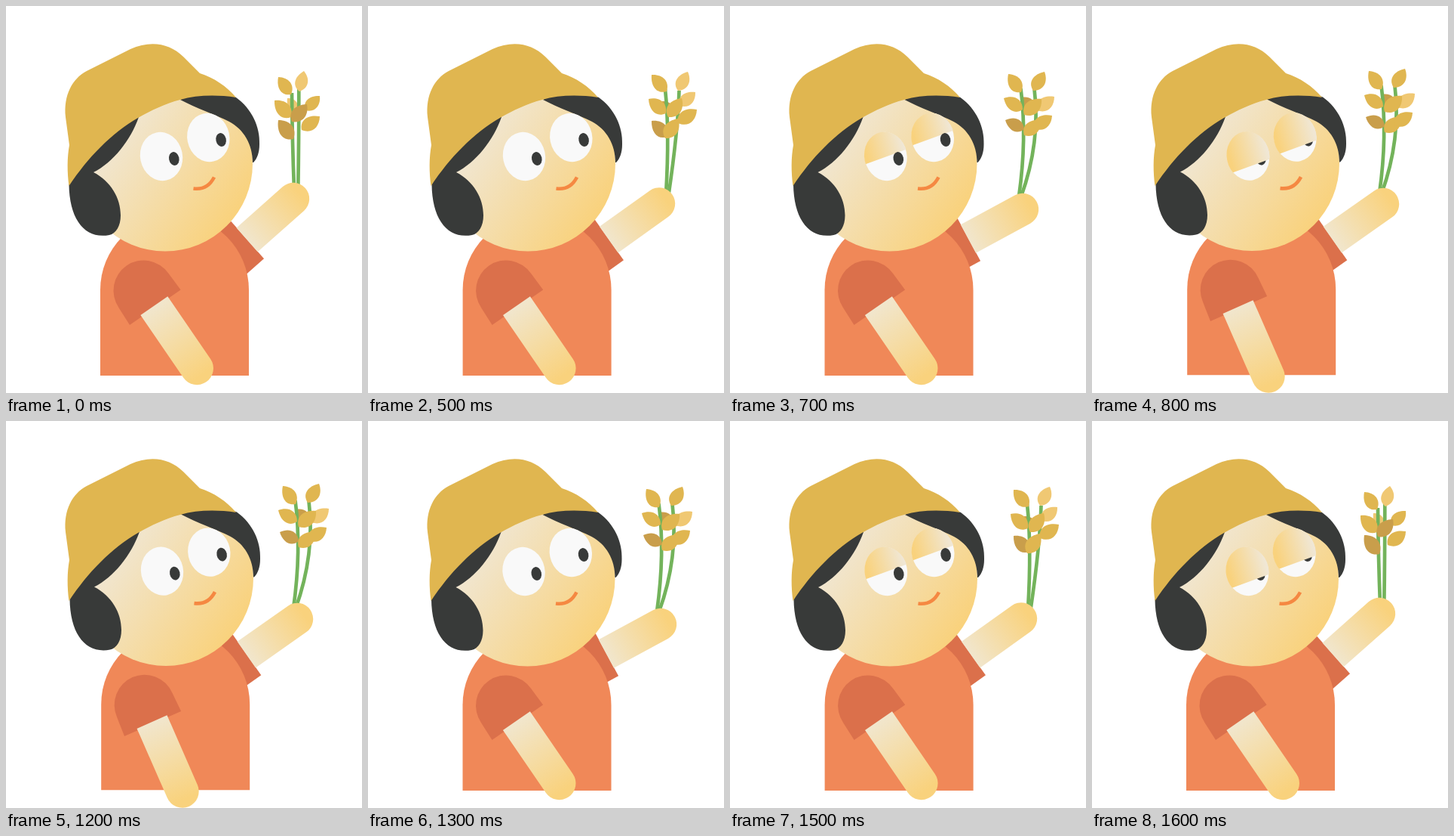
Animation of 472 by 512 pixels, one loop 1800 ms. Source, as an HTML page with a canvas:

```html
<!DOCTYPE html>
<html lang="en">
<head>
<meta charset="utf-8">
<title>Girl with wheat</title>
<style>
html, body { margin: 0; width: 100%; height: 100%; overflow: hidden; background: #fff; }
canvas { display: block; }
</style>
</head>
<body>
<canvas id="stage" width="472" height="512"></canvas>
<script>
const ctx = document.getElementById('stage').getContext('2d');
const RAD = Math.PI / 180, LOOP = 1800;
const SKIN = '#f9d27d', PALE = '#f0e7d5', HAIR = '#383a39', HAT = '#e0b650';
const SHIRT = '#f08858', SLEEVE = '#db704b', STEM = '#73b35b';
const GRAIN = { l: '#f0c873', m: '#e0b650', d: '#c99e4b' };

// Each leaf: colour, base x, base y, tip x, tip y. The first one lies behind the stems.
const straight = {
  stems: [[379, 115, 379.5, 180, 382, 242], [388.3, 109, 388.3, 180, 387.3, 242]],
  leaves: [
    ['l', 386, 138, 373, 122], ['m', 378, 117, 361, 94], ['l', 389, 113, 395, 86],
    ['m', 378, 147, 356, 125], ['m', 397, 138, 416, 119],
    ['d', 379, 153, 399, 130], ['d', 381, 176, 361, 151], ['m', 392, 164, 416, 146]]
};
const leanRight = {
  stems: [[394, 110, 400, 165, 395, 250], [412.5, 112, 411, 165, 398.5, 250]],
  leaves: [
    ['d', 403, 139, 390, 126], ['m', 396, 113, 376, 91], ['l', 411, 112, 424, 87],
    ['m', 395, 142, 372, 123], ['l', 413, 132, 434, 114], ['m', 398, 147, 416, 122],
    ['d', 397, 173, 376, 152], ['m', 394, 175, 411, 149], ['m', 411, 155, 436, 137]]
};
const leanLeft = {
  stems: [[385.5, 109, 394, 175, 383, 252], [403.5, 110, 412, 180, 386, 252]],
  leaves: [
    ['d', 404, 136, 386, 121], ['m', 386, 114, 369, 90], ['m', 402, 112, 417, 87],
    ['m', 388, 137, 363, 122], ['l', 407, 138, 430, 120], ['m', 390, 144, 413, 123],
    ['d', 390, 163, 365, 151], ['m', 390, 171, 412, 151], ['m', 403, 162, 427, 145]]
};

const up = { hand: [381, 255], tilt: -41.5, wheat: straight, sway: [0, 0],
             head: [0, 0], body: [0, 0], swing: 55.5 };
const mid = { ...up, hand: [386, 261.5], tilt: -35.5, wheat: leanRight, head: [1, 0], body: [0.6, 0] };
const low = { ...up, hand: [388, 269], tilt: -28.4, wheat: leanLeft, head: [0.5, 0], body: [0.5, 0] };
const far = { ...up, hand: [382.5, 255], wheat: straight, sway: [12, 0.5],
              head: [1.2, -0.7], body: [1.2, -0.8], swing: 66.3 };
const turn = { ...far, hand: [386, 262], tilt: -35, wheat: leanLeft, sway: [-2, -4], head: [1, -0.4] };

// Start time, pose, lid (0 open, 1 half, 2 nearly shut)
const steps = [
  [0, up, 0], [500, mid, 0], [700, low, 1], [800, turn, 2], [1000, far, 1],
  [1200, turn, 0], [1300, low, 0], [1500, mid, 1], [1600, up, 2]
];

function at([x, y], deg, draw) {
  ctx.save();
  ctx.translate(x, y);
  ctx.rotate(deg * RAD);
  draw();
  ctx.restore();
}

function shape(d, color) {
  ctx.fillStyle = color;
  ctx.fill(new Path2D(d));
}

function oval(x, y, rx, ry, deg, color) {
  ctx.beginPath();
  ctx.ellipse(x, y, rx, ry, deg * RAD, 0, 2 * Math.PI);
  ctx.fillStyle = color;
  ctx.fill();
}

function blend(x0, y0, x1, y1, from, to) {
  const g = ctx.createLinearGradient(x0, y0, x1, y1);
  g.addColorStop(0, from);
  g.addColorStop(1, to);
  return g;
}

function forearm(start, end, r) {
  ctx.beginPath();
  ctx.moveTo(start, -r);
  ctx.lineTo(end, -r);
  ctx.arc(end, 0, r, -Math.PI / 2, Math.PI / 2);
  ctx.lineTo(start, r);
  ctx.fillStyle = blend(start, 0, end + r / 2, 0, '#f1e6cd', SKIN);
  ctx.fill();
}

function leaf([tone, x0, y0, x1, y1]) {
  const len = Math.hypot(x1 - x0, y1 - y0), w = len * 0.42;
  at([x0, y0], Math.atan2(y1 - y0, x1 - x0) / RAD, () => {
    ctx.beginPath();
    ctx.moveTo(0, 0);
    ctx.bezierCurveTo(len * 0.2, -w, len * 0.65, -w * 0.9, len, 0);
    ctx.bezierCurveTo(len * 0.7, w * 0.9, len * 0.25, w, 0, 0);
    ctx.fillStyle = GRAIN[tone];
    ctx.fill();
  });
}

function wheat({ stems, leaves }) {
  leaf(leaves[0]);
  ctx.strokeStyle = STEM;
  ctx.lineWidth = 4.7;
  for (const [x0, y0, cx, cy, x1, y1] of stems) {
    ctx.beginPath();
    ctx.moveTo(x0, y0);
    ctx.quadraticCurveTo(cx, cy, x1, y1);
    ctx.stroke();
  }
  leaves.slice(1).forEach(leaf);
}

function raisedArm(p) {
  at(p.hand, p.tilt, () => {
    ctx.fillStyle = SLEEVE;
    ctx.fillRect(-132, -32.5, 50.3, 66);
  });
  at(p.sway, 0, () => wheat(p.wheat));
  at(p.hand, p.tilt, () => forearm(-82, 0, 21.2));
}

function torso() {
  shape('M125 489V375.5A98.5 98.5 0 0 1 322 375.5V489Z', SHIRT);
}

function loweredArm(deg) {
  at([182.5, 376.5], deg, () => {
    shape('M0-40L27-41V41L0 40A40 40 0 0 1 0-40Z', SLEEVE);
    forearm(24.5, 124.8, 21.8);
  });
}

function eye(x, y, lid) {
  const pupil = () => oval(x + 16.8, y + 3, 6.7, 9, -12, HAIR);
  oval(x, y, 28, 32.3, -12, '#f9f9f9');
  if (lid !== 1) pupil();
  if (lid) {
    ctx.save();
    ctx.beginPath();
    ctx.ellipse(x, y, 28.4, 32.7, -12 * RAD, 0, 2 * Math.PI);
    ctx.clip();
    at([x, y], -20, () => {
      ctx.fillStyle = blend(-24, 0, 26, 4, SKIN, PALE);
      ctx.fillRect(-40, -40, 80, lid === 1 ? 40.5 : 53.5);
    });
    ctx.restore();
  }
  if (lid === 1) pupil();
}

function face(lid) {
  oval(211, 208.5, 116, 116, 0, blend(142, 162, 302, 277, PALE, SKIN));
  // Both hair pieces reach up under the hat.
  shape('M83.5 236L120 170L176 135V147C165 178 142 207 116 220C139 232 152 254 152 277' +
        'C152 291 146 301 137 303C105 309 84 283 83.5 236Z', HAIR);
  shape('M231 124L265 105L305 121C326 136 337 160 336 183' +
        'C336 194 333 202 328 207H327C327 183 315 163 296 153C278 144 252 135 231 124Z', HAIR);
  eye(206, 199, lid);
  eye(268.3, 174, lid);
  ctx.strokeStyle = '#f58842';
  ctx.lineWidth = 4.6;
  ctx.stroke(new Path2D('M248.5 241.5Q267 244 276 226.5'));
}

function hat() {
  shape('M83.5 238C81 220 81 200 84 184L79 147C76 118 88 96 107 86L165 57' +
        'C191 45 217 49 235 67L257 89C276 95 292 106 305 121' +
        'C278 117 252 118 231 124C211 129 193 138 175 148C139 169 109 200 83.5 238Z', HAT);
}

function render(now) {
  const t = now % LOOP;
  const [, pose, lid] = steps.findLast(s => s[0] <= t);
  ctx.fillStyle = '#fff';
  ctx.fillRect(0, 0, 472, 512);
  raisedArm(pose);
  at(pose.body, 0, torso);
  at(pose.head, 0, () => face(lid));
  hat();
  at(pose.body, 0, () => loweredArm(pose.swing));
}

let begin;
function tick(now) {
  begin ??= now;
  render(Math.max(0, now - begin));
  requestAnimationFrame(tick);
}
render(0);
requestAnimationFrame(tick);
</script>
</body>
</html>
```
